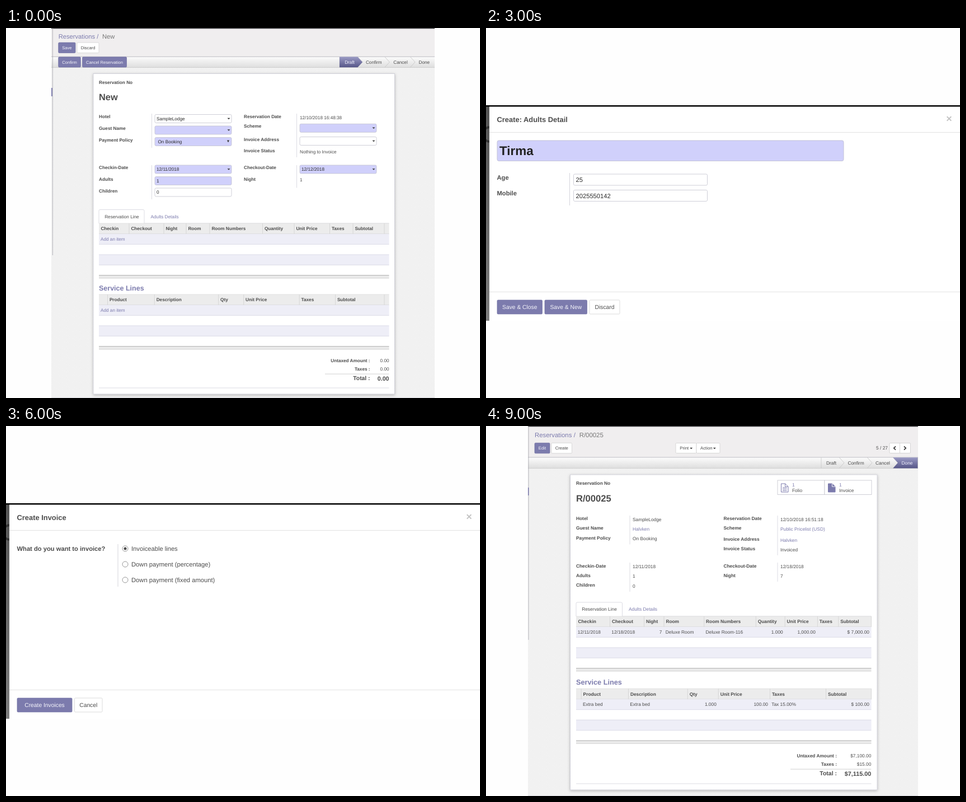
These frames come from a looping animation (847 px wide and 661 px high, 10000 ms). An HTML page:

```html
<!DOCTYPE html>
<html lang="en">
<head>
<meta charset="utf-8">
<title>Hotel reservation walkthrough</title>
<style>
  html, body { margin: 0; width: 100%; height: 100%; overflow: hidden; background: #fefefe; }
  #stage { display: block; width: 100%; height: 100%; }
  text { font-family: "Liberation Sans", Arial, sans-serif; text-rendering: geometricPrecision; white-space: pre; }
</style>
</head>
<body>
<svg id="stage" viewBox="0 0 847 661">
  <defs>
    <pattern id="weave" width="2.6" height="2.6" patternUnits="userSpaceOnUse">
      <rect width="2.6" height="2.6" fill="#f6f6f6"/>
      <path d="M0 2.6L2.6 0" stroke="#e6e6e6" stroke-width=".8"/>
    </pattern>
    <linearGradient id="bar" x2="0" y2="1"><stop stop-color="#fcfcfc"/><stop offset="1" stop-color="#dedede"/></linearGradient>
    <linearGradient id="step" x2="0" y2="1"><stop stop-color="#9a9ac4"/><stop offset="1" stop-color="#565688"/></linearGradient>
    <linearGradient id="shade" x2="0" y2="1"><stop stop-color="#555"/><stop offset="1" stop-color="#7d7d7d"/></linearGradient>
    <filter id="shadow" x="-5%" y="-5%" width="110%" height="110%">
      <feDropShadow dx="0" dy="1.5" stdDeviation="2.5" flood-opacity=".25"/>
    </filter>
  </defs>
</svg>
<script>
const PURPLE = '#7c7bad', INK = '#4c4c4c', REQUIRED = '#d0d0fb', LINE = '#d4d4dc';
const GUEST = 'Halvken', ADULT = 'Tirma', MOBILE = '2025550142', HOTEL = 'SampleLodge';
const PRICELIST = 'Public Pricelist (USD)';
let em = 8.2; // body text size of the form being drawn

// Drawing helpers; text is placed by the vertical middle of its capitals.
function text(x, y, s, { size = em, bold = false, fill = INK, anchor = 'start' } = {}) {
  return `<text x="${x}" y="${y + size * 0.358}" font-size="${size}" fill="${fill}" text-anchor="${anchor}"` +
    `${bold ? ' font-weight="700"' : ''}>${s}</text>`;
}
const label = (x, y, s) => text(x, y, s, { bold: true });
const right = (x, y, s, opt) => text(x, y, s, { anchor: 'end', ...opt });
const rect = (x, y, w, h, fill, extra = '') =>
  `<rect x="${x}" y="${y}" width="${w}" height="${h}" fill="${fill}" ${extra}/>`;
const path = (d, stroke = LINE, width = 0.8, fill = 'none') =>
  `<path d="${d}" stroke="${stroke}" stroke-width="${width}" fill="${fill}"/>`;
const hline = (x1, x2, y, color, width) => path(`M${x1} ${y}H${x2}`, color, width);
const vline = (x, y1, y2, color, width) => path(`M${x} ${y1}V${y2}`, color, width);
const caret = (x, y, w = 5, h = 2.6) => `<path d="M${x - w / 2} ${y - h / 2}h${w}l${-w / 2} ${h}z" fill="#333"/>`;

function button(x1, x2, y, h, s, plain = false, size = em * 0.925) {
  return rect(x1, y, x2 - x1, h, plain ? '#fff' : PURPLE, `rx="1.5" stroke="${plain ? '#ccc' : '#6f6ea3'}" stroke-width=".7"`) +
    text((x1 + x2) / 2, y + h / 2, s, { size, fill: plain ? INK : '#f6f6fc', anchor: 'middle' });
}

function field(x, y, s, { required = false, menu = true, w = 137, h = 15, pad = 3 } = {}) {
  return rect(x, y, w, h, required ? REQUIRED : '#fff', 'rx="2.2" stroke="#c3c3cf" stroke-width=".8"') +
    text(x + pad, y + h / 2, s, { fill: '#2a2a2a' }) + (menu ? caret(x + w - 5, y + h / 2) : '');
}

function linkIcon(x, y) {
  return path(`M${x + 1} ${y - 3.6}h-5.5q-1.3 0-1.3 1.3v6q0 1.3 1.3 1.3h6.8q1.3 0 1.3-1.3v-2.7`, PURPLE, 1.3) +
    path(`M${x - 1.8} ${y + 1.6}L${x + 4.5} ${y - 4}`, PURPLE, 1.7) +
    `<path d="M${x + 1.4} ${y - 5}h4.6v4.6z" fill="${PURPLE}"/>`;
}

function steps(edges, centers, y, h, active) {
  const mid = y + h / 2, end = y + h, tip = 8.7;
  let out = edges.slice(1, 4).map(x => path(`M${x - tip} ${y}L${x} ${mid}L${x - tip} ${end}`, '#c4c4c4')).join('');
  out += vline(edges[0], y, end, '#c8c8c8');
  const a = edges[active] - (active ? tip : 0), b = edges[active + 1];
  const nose = active < 3 ? `H${b - tip}L${b} ${mid}L${b - tip} ${end}` : `H${b}V${end}`;
  out += `<path d="M${a} ${y}${nose}H${a}${active ? `L${a + tip} ${mid}` : ''}z" fill="url(#step)"/>`;
  return out + ['Draft', 'Confirm', 'Cancel', 'Done'].map((s, i) =>
    text(centers[i], mid, s, { anchor: 'middle', fill: i === active ? '#f2f2ff' : INK })).join('');
}

function chrome(x1, x2, top, barY, barH, bottom) {
  return rect(x1, top, x2 - x1, bottom - top, 'url(#weave)') +
    rect(x1, top, x2 - x1, barY - top, '#f0eeef') +
    rect(x1, barY, x2 - x1, barH, 'url(#bar)') +
    hline(x1, x2, barY, '#afafb6') + hline(x1, x2, barY + barH, '#cacaca') +
    hline(x1, x2, top + 0.6, '#2f2f33', 1.2);
}
const sheet = (x1, x2, y1, y2) =>
  rect(x1, y1, x2 - x1, y2 - y1, '#fff', 'stroke="#c8c8d3" stroke-width=".8" filter="url(#shadow)"');

const crumbs = (x, y, s) => text(x, y, 'Reservations', { size: em * 1.365, fill: PURPLE }) +
  text(x + em * 8.35, y, '/', { size: em * 1.365, fill: PURPLE }) + text(x + em * 9.55, y, s, { size: em * 1.365, fill: '#777' });

function tabs(x, x2, y1, y2, tab1, tab2, second) {
  const [a, b] = second ? tab2 : tab1;
  return hline(x, x2, y2) + rect(a, y2 - 1, b - a, 2, '#fff') +
    path(`M${a} ${y2}V${y1 + 2}q0-2 2-2H${b - 2}q2 0 2 2V${y2}`) +
    text(tab1[0] + 10.2, (y1 + y2) / 2, 'Reservation Line', { fill: second ? PURPLE : INK }) +
    text(tab2[0] + 10.2, (y1 + y2) / 2, 'Adults Details', { fill: second ? INK : PURPLE });
}

const LINE_HEADS = ['Checkin', 'Checkout', 'Night', 'Room', 'Room Numbers', 'Quantity', 'Unit Price', 'Taxes', 'Subtotal'];
const SERVICE_HEADS = ['', 'Product', 'Description', 'Qty', 'Unit Price', 'Taxes', 'Subtotal'];
const LINE_ROW = ['12/11/2018', '12/18/2018', '7', 'Deluxe Room', 'Deluxe Room-116', '1.000', '1,000.00', '', '$ 7,000.00'];
const SERVICE_ROW = ['', 'Extra bed', 'Extra bed', '1.000', '100.00', 'Tax 15.00%', '$ 100.00'];

// `cols` holds the left edge of each column and finally the right edge of the table.
function table(y, cols, heads, row, editable, x2 = cols[cols.length - 1]) {
  const x = cols[0], head = 18.9, step = 18.5, body = y + head, foot = body + 4 * step;
  let out = rect(x, y, x2 - x, head, '#ececec') + hline(x, x2, y, '#ddd') + hline(x, x2, body, '#c9c9cf');
  for (const r of [0, 2]) out += rect(x, body + r * step, x2 - x, step, '#eeeef7');
  for (const r of [1, 2, 3]) out += hline(x, x2, body + r * step, '#d5d5e2');
  out += cols.slice(1).map(c => vline(c, y, body, '#d2d2d2')).join('');
  out += heads.map((s, i) => label(cols[i] + 3.4, y + head / 2, s)).join('');
  const numeric = /^(Night|Quantity|Qty|Unit Price|Subtotal)$/;
  if (row) out += row.map((s, i) => numeric.test(heads[i])
    ? right(cols[i + 1] - 3.5, body + step / 2, s) : text(cols[i] + 2.8, body + step / 2, s)).join('');
  if (editable) out += text(x + 3, body + step * (row ? 1.5 : 0.5), 'Add an item', { fill: PURPLE });
  return out + rect(x, foot, x2 - x, 5, '#ececec') + hline(x, x2, foot, '#b9b9b9', 1.2) + hline(x, x2, foot + 5, '#c6c6c6');
}

function totals(labelX, valueX, ruleX, y, [net, tax, total]) {
  return right(labelX, y, 'Untaxed Amount :', { bold: true }) + right(valueX, y, net) +
    right(labelX, y + 14.5, 'Taxes :', { bold: true }) + right(valueX, y + 14.5, tax) +
    hline(ruleX, valueX, y + 23.6, '#c4c4c4') +
    right(labelX, y + 31.2, 'Total :', { bold: true, size: em * 1.26 }) +
    right(valueX, y + 31.2, total, { bold: true, size: em * 1.3 });
}
const AMOUNTS = ['$7,100.00', '$15.00', '$7,115.00'];

function editForm({ filled, adults, adult, time, top = 0, crumbY = 14.5, bottom = 661, sheetEnd = 654, panelEnd = 406 }) {
  em = 8.2;
  const req = { required: true }, links = filled ? linkIcon(409.6, 182.5) + linkIcon(668.6, 178.5) + linkIcon(668.6, 201.8) : '';
  let out = chrome(81, 766, top, 51.3, 19.2, bottom) + vline(83.3, top, panelEnd, '#a5a5ad') +
    rect(81, 107, 1.8, 15, PURPLE) + crumbs(93.7, crumbY, 'New') +
    button(93.7, 124, 26, 18.5, 'Save') + button(127, 166, 26, 18.5, 'Discard', true) +
    button(93.7, 133.3, 51.8, 18.2, 'Confirm') + button(136.5, 215.5, 51.8, 18.2, 'Cancel Reservation') +
    steps([596, 637, 685.5, 731, 766], [614, 657.3, 705, 747.3], 51.5, 18.8, 0) +
    sheet(156, 694.5, 81.5, sheetEnd) + label(166, 97, 'Reservation No') +
    text(166, 123.5, 'New', { size: 16.4, bold: true });

  out += label(166, 158.5, 'Hotel') + label(166, 179.5, 'Guest Name') + label(166, 200, 'Payment Policy') +
    vline(260.5, 153, 214) + field(266, 154.5, HOTEL) + field(266, 175, filled ? GUEST : '', req) +
    field(266, 195.5, 'On Booking', { required: true, menu: false, pad: 5.5 }) + caret(397, 202.5, 4, 4) +
    label(425, 158.5, 'Reservation Date') + label(425, 175.5, 'Scheme') +
    label(425, 199, 'Invoice Address') + label(425, 219.5, 'Invoice Status') + vline(519.5, 153, 231) +
    text(525, 160, time) + field(525, 171.3, filled ? PRICELIST : '', req) +
    field(525, 194.5, filled ? GUEST : '') + text(525, 221, 'Nothing to Invoice') + links;

  out += label(166, 249, 'Checkin-Date') + label(166, 270, 'Adults') + label(166, 290.7, 'Children') +
    vline(260.5, 245, 306) + field(266, 245, '12/11/2018', req) +
    field(266, 265.5, '1', { required: true, menu: false }) + field(266, 286, '0', { menu: false }) +
    label(425, 249, 'Checkout-Date') + label(425, 270, 'Night') + vline(519.5, 245, 285.5) +
    field(525, 245, filled ? '12/18/2018' : '12/12/2018', req) + text(525, 271, filled ? '7' : '1') +
    tabs(166, 684.5, 324.5, 349, [166, 247], [248.4, 318.5], adults);

  if (adults) {
    out += label(166, 361, 'Adults Detail') + vline(260.5, 355, adult ? 410 : 382.5) +
      button(266, 302.2, 360, 18.5, 'Create') + (adult ? text(273, 391.5, ADULT) : '');
  } else {
    out += table(349, [166, 220, 282, 322, 364, 458.5, 515, 578.5, 620, 676], LINE_HEADS, filled && LINE_ROW, true, 684.5) +
      text(166, 465, 'Service Lines', { size: 12.5, bold: true, fill: PURPLE }) +
      table(476, [166, 181.5, 265.3, 379.7, 424.7, 524.2, 588.5, 676], SERVICE_HEADS, filled && SERVICE_ROW, true, 684.5) +
      totals(650.5, 684.5, 570, 594.5, filled ? AMOUNTS : ['0.00', '0.00', '0.00']);
  }
  return out + hline(166, 684.5, sheetEnd - 11) + hline(81, 766, bottom - 0.4);
}

function statButton(x, s, solid) {
  const icon = `M${x + 6.5} 103h7l5.5 5.3v9.7h-12.5z`;
  return rect(x, 97, 84, 25.5, '#fff', 'stroke="#c4c4cc" stroke-width=".8"') +
    path(icon, PURPLE, 1, solid ? PURPLE : '#fff') +
    path(`M${x + 13.5} 103v5.3h5.5`, solid ? '#fff' : PURPLE, 0.9) +
    (solid ? '' : [110, 112.7, 115.4].map(y => hline(x + 9, x + 16.5, y, PURPLE, 1)).join('')) +
    text(x + 26, 105, '1', { fill: PURPLE }) + text(x + 26, 114.8, s);
}

function pager(x, s) {
  return right(x, 39, s) + rect(721, 30.5, 37.5, 18, '#fff', 'rx="1.5" stroke="#ccc" stroke-width=".8"') +
    vline(739.5, 30.5, 48.5, '#ccc') + path('M732 36.3l-3.2 3.2l3.2 3.2M747 36.3l3.2 3.2l-3.2 3.2', '#333', 1.7);
}

function viewForm({ state, actions = [], invoiced, folio, reading }) {
  em = 8.35;
  const link = { fill: PURPLE };
  let out = chrome(75, 772, 0, 56, 19.6, 661) + vline(76, 0, 382, '#a5a5ad') + crumbs(87, 15.5, 'R/00025');
  if (reading) {
    out += button(87, 114, 30.3, 18.5, 'Edit') + button(117, 153.5, 30.3, 18.5, 'Create', true) +
      button(339, 376, 30.5, 18, 'Print  &#160;', true) + button(376, 418, 30.5, 18, 'Action  &#160;', true) +
      caret(366.7, 40) + caret(408.3, 40) + pager(718, '5 / 27') + rect(75, 110, 1.5, 14, PURPLE);
  } else {
    out += button(87, 118, 30.3, 18.5, 'Save') + button(121, 160.5, 30.3, 18.5, 'Discard', true) + pager(718, '4 / 4');
  }
  out += actions.map(([x1, x2, s]) => button(x1, x2, 56.5, 18.6, s)).join('') +
    steps([599, 640, 690, 736, 772], [617, 661, 709, 752.5], 56.2, 19.2, state) + vline(771.6, 56, 75.5, '#bbb') +
    sheet(150.5, 699, 87, 650) + label(161, 102.5, 'Reservation No') +
    text(161, 129.5, 'R/00025', { size: 16.6, bold: true }) +
    (folio ? statButton(521, 'Folio', false) : '') + (invoiced ? statButton(605, 'Invoice', true) : '');

  out += label(161, 165.3, 'Hotel') + label(161, 182.5, 'Guest Name') + label(161, 200, 'Payment Policy') +
    vline(257, 160, 211.5) + text(262, 166.8, HOTEL) + text(262, 184, GUEST, link) + text(262, 201.2, 'On Booking') +
    label(424.5, 165.3, 'Reservation Date') + label(424.5, 182.5, 'Scheme') +
    label(424.5, 202.3, 'Invoice Address') + label(424.5, 219.5, 'Invoice Status') + vline(521, 160, 231) +
    text(526, 166.8, '12/10/2018 16:51:18') + text(526, 184, PRICELIST, link) +
    text(526, 203.8, GUEST, link) + text(526, 221, invoiced ? 'Invoiced' : 'Nothing to Invoice') +
    label(161, 249.7, 'Checkin-Date') + label(161, 267, 'Adults') + label(161, 284.3, 'Children') +
    vline(257, 244, 296) + text(262, 251, '12/11/2018') + text(262, 268.3, '1') + text(262, 285.6, '0') +
    label(424.5, 249.7, 'Checkout-Date') + label(424.5, 267, 'Night') + vline(521, 244, 278) +
    text(526, 251, '12/18/2018') + text(526, 268.3, '7');

  const serviceCols = reading ? [161, 170.2, 254.5, 360.3, 415.3, 507.5, 607.5, 688.5] : [161, 176.5, 259.5, 364, 418.5, 509.2, 608.3, 688.5];
  out += tabs(161, 688.5, 315, 340, [161, 243.5], [244.8, 316], false) +
    table(340, [161, 221.5, 282.5, 318, 389.7, 482.3, 534.2, 592.4, 629.8, 688.5], LINE_HEADS, LINE_ROW) +
    text(161, 457.5, 'Service Lines', { size: 12.7, bold: true, fill: PURPLE }) +
    table(469.3, serviceCols, SERVICE_HEADS, SERVICE_ROW) +
    (reading ? '' : path('M164.8 497.3h7.6M168.6 493.5v7.6', '#444', 1.3) +
      path('M166 495.8l-1.5 1.5l1.5 1.5M171.2 495.8l1.5 1.5l-1.5 1.5M167.1 494.7l1.5-1.5l1.5 1.5M167.1 499.9l1.5 1.5l1.5-1.5', '#444', 0.9)) +
    totals(627, 688.3, 544, 589.5, AMOUNTS);
  return out + hline(161, 688.5, 639) + hline(75, 772, 660.6);
}

function dialog(title, content, buttons) {
  em = 11.2;
  return rect(0, 140, 7, 383, 'url(#shade)') + path('M0 176a8 14 0 0 0 0 28', '#333', 3) +
    `<circle cx="7" cy="190" r="13" fill="none" stroke="#333" stroke-width="4"/>` +
    rect(6, 140, 841, 383, '#fff') + rect(0, 138, 847, 2.5, '#000') +
    text(19.5, 163.3, title, { size: 12.9, bold: true }) +
    text(827.5, 162, '×', { size: 18, bold: true, fill: '#c4c4c4', anchor: 'middle' }) +
    hline(6, 847, 186.5, '#e2e2e2', 1) + content + hline(6, 847, 471.5, '#e2e2e2', 1) +
    buttons.map(([x1, x2, s, plain]) => button(x1, x2, 486, 25, s, plain, 10.3)).join('');
}

function adultDialog() {
  em = 11.2;
  const box = { w: 239, h: 20, menu: false, pad: 4 };
  return dialog('Create: Adults Detail',
    rect(20, 201, 619, 36.5, REQUIRED, 'rx="3" stroke="#c3c3d8" stroke-width="1"') +
    text(24, 219, ADULT, { size: 22.5, bold: true, fill: '#222' }) +
    label(19.5, 266.8, 'Age') + label(19.5, 295, 'Mobile') + vline(149.5, 259, 317, LINE, 1) +
    field(156.5, 261, '25', box) + field(156.5, 289.5, MOBILE, box),
    [[20, 100.5, 'Save &amp; Close'], [105, 180.5, 'Save &amp; New'], [185, 239, 'Discard', true]]);
}

function invoiceDialog() {
  em = 11.2;
  const choices = ['Invoiceable lines', 'Down payment (percentage)', 'Down payment (fixed amount)'];
  return dialog('Create Invoice',
    label(19.5, 219, 'What do you want to invoice?') + vline(200, 211, 287, LINE, 1) +
    choices.map((s, i) => `<circle cx="213" cy="${219 + 28 * i}" r="5" fill="#fff" stroke="#999"/>` +
      (i ? '' : `<circle cx="213" cy="219" r="2.5" fill="${INK}"/>`) + text(224, 219 + 28 * i, s)).join(''),
    [[20, 118, 'Create Invoices'], [122.5, 172, 'Cancel', true]]);
}

// Shows form content, scaled by k and shifted by dx, dy, inside a stage rectangle.
function view(x, y, w, h, k, dx, dy, content) {
  const box = [(x - dx) / k, (y - dy) / k, w / k, h / k].join(' ');
  return `<svg x="${x}" y="${y}" width="${w}" height="${h}" viewBox="${box}" preserveAspectRatio="none">${content}</svg>`;
}
const editView = opt => view(81, 0, 685, 661, 1, 0, 0, editForm(opt));
const viewLarge = opt => view(73, 0, 701, 661, 1.0046, -1.7, 0, viewForm(opt));
const viewSmall = opt => view(75, 0, 697, 661, 1, 0, 0, viewForm(opt));
const adultsTab = { filled: true, adults: true, time: '12/10/2018 16:58:37', crumbY: 11 };
const mail = [87, 183, 'Send Reservation Email'];

const scenes = [
  editView({ time: '12/10/2018 16:48:38' }),
  editView({ time: '12/10/2018 16:48:38', filled: true }),
  view(0, 58, 847, 544, 1.2433, -105.4, 62.4,
    editForm({ ...adultsTab, top: -3.5, bottom: 433.8, sheetEnd: 422.8 })),
  adultDialog(),
  view(0, 53, 847, 554, 1.2563, -104, 57.1,
    editForm({ ...adultsTab, adult: true, top: -3.2, bottom: 437.6, sheetEnd: 427, panelEnd: 371.6 })),
  viewSmall({ state: 1, actions: [mail, [186, 249, 'Create Invoice'], [251.5, 332.5, 'Cancel Reservation']] }),
  invoiceDialog(),
  viewLarge({ state: 1, invoiced: true, actions: [mail, [185.8, 241, 'Create Folio'], [243.8, 324.7, 'Cancel Reservation']] }),
  viewLarge({ state: 3, invoiced: true, folio: true }),
  viewSmall({ state: 3, invoiced: true, folio: true, reading: true })
];

const stage = document.getElementById('stage');
stage.insertAdjacentHTML('beforeend', scenes.map(s => `<g class="scene" display="none">${s}</g>`).join(''));
const groups = stage.querySelectorAll('.scene');
let shown = -1;
function tick() {
  const now = Math.floor(performance.now() / 1000) % scenes.length;
  if (now !== shown) {
    groups.forEach((g, i) => g.setAttribute('display', i === now ? 'inline' : 'none'));
    shown = now;
  }
  requestAnimationFrame(tick);
}
tick();
</script>
</body>
</html>
```
